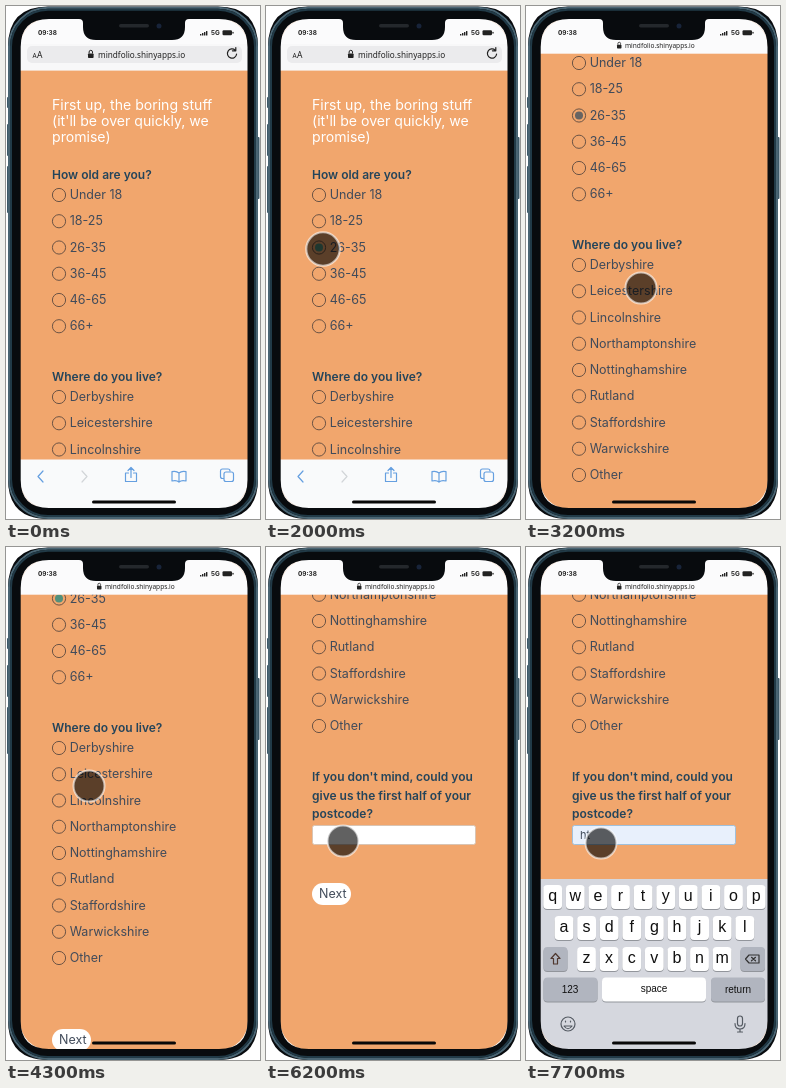
Animation, 254 px wide and 513 px high, one loop 8 s. Source, as an HTML page:

```html
<!DOCTYPE html>
<html lang="en">
<head>
<meta charset="utf-8">
<title>Phone survey</title>
<style>
  html, body { margin: 0; width: 100%; height: 100%; overflow: hidden; background: #fff; }
  svg { display: block; width: 254px; height: 513px; }
  text { font-family: Inter, "Open Sans", sans-serif; font-size: 12.5px; fill: #414b5a; }
  .title { font-size: 14.1px; font-weight: 400; fill: #fff; }
  .ask { font-size: 12px; font-weight: 600; fill: #24445a; }
  .ring { fill: none; stroke: #5d4a40; stroke-width: .9; }
  .status { font-size: 6.4px; font-weight: 700; fill: #222; }
  .url { font-family: "Noto Sans", "Open Sans", sans-serif; fill: #222; }
  .key { font-family: "Liberation Sans", Arial, sans-serif; font-size: 16px; fill: #111; text-anchor: middle; }
  .small { font-size: 10px; }
  .line { fill: none; stroke-width: 1.2; stroke-linecap: round; stroke-linejoin: round; }
  .blue { stroke: #659fe0; }
</style>
</head>
<body>
<svg id="stage" viewBox="0 0 254 513"></svg>
<script>
const LOOP = 8000, STEP = 100;
const ages = ["Under 18", "18-25", "26-35", "36-45", "46-65", "66+"];
const places = ["Derbyshire", "Leicestershire", "Lincolnshire", "Northamptonshire",
  "Nottinghamshire", "Rutland", "Staffordshire", "Warwickshire", "Other"];

// Rows of [time, value, ...], eased between neighbours.
const touchPath = [
  [700, 150, 535], [1500, 57, 243], [2000, 57, 243], [2600, 115, 414],
  [3200, 115, 282], [3300, 115, 282], [3600, 115, 224], [3700, 115, 224],
  [4300, 83, 239], [4600, 53, 227], [4800, 53, 227], [5200, 98, 379],
  [5500, 98, 263], [5800, 98, 147], [6200, 77, 294], [6400, 75, 296]
];
const pressPath = [
  [1300, 1], [1500, 1.08], [2000, 1.08], [2300, 1], [4400, 1], [4600, 1.08], [4800, 1.08], [5100, 1]
];
const scrollPath = [
  [2600, 0], [3200, 132], [3300, 132], [3600, 190], [5200, 190], [5500, 306], [5800, 422]
];
const collapsePath = [[2600, 0], [3000, 1]];
const keysPath = [[6500, 180], [6800, 0]];

const text = (x, mid, s, cls = "", drop = 4.3) =>
  `<text x="${x}" y="${mid + drop}" class="${cls}">${s}</text>`;
const rect = (x, y, w, h, r, fill, more = "") =>
  `<rect x="${x}" y="${y}" width="${w}" height="${h}" rx="${r}" fill="${fill}" ${more}/>`;
const line = (d, cls = "blue", more = "") => `<path d="${d}" class="line ${cls}" ${more}/>`;

const choices = (list, top) => list.map((s, i) => {
  const y = top + i * 26.25;
  return `<circle cx="53" cy="${y}" r="6.6" class="ring"/>` + text(63.7, y - .2, s);
}).join("");
const lines = (list, top, gap, cls) =>
  list.map((s, i) => text(46, top + i * gap, s, cls, cls == "title" ? 4.8 : 4.3)).join("");

function page() {
  return lines(["First up, the boring stuff", "(it'll be over quickly, we", "promise)"], 99, 16, "title")
    + text(46, 169, "How old are you?", "ask") + choices(ages, 189)
    + text(46, 371, "Where do you live?", "ask")
    + `<circle id="halo" cx="53" cy="417" r="24" fill="#e0ad78" opacity=".28"/>`
    + choices(places, 391)
    + `<circle id="ageDot" cx="53" cy="241.5" r="4"/>`
    + `<circle id="placeDot" cx="53" cy="417.2" r="4" fill="#686462"/>`
    + `<g id="postcode">`
    + lines(["If you don't mind, could you", "give us the first half of your", "postcode?"], 652, 18.4, "ask")
    + `<rect id="field" x="46.5" y="700.5" width="163" height="19" rx="2"/>`
    + `<text id="typed" x="54" y="714" style="font-size:11px"></text>`
    + `<path id="caret" d="M54 704V716" stroke="#333"/></g>`
    + `<g id="next">` + rect(46, -11, 39, 22, 11, "#fff") + text(53, 0, "Next", "", 4) + `</g>`;
}

function header() {
  const signal = [0, 1, 2, 3].map(i => rect(194 + i * 2, 28 - i, 1.4, 1.6 + i, .3, "#222")).join("");
  return rect(14, 10, 229, 37.7, 0, "#fbfbfc")
    + `<g id="bar">` + rect(14, 38, 229, 26.6, 0, "#f8f8f9") + rect(21, 40, 215, 17, 5, "#ebebed")
    + `<g style="font-size:7px">` + `<text x="26.5" y="51.500" class="url" style="font-size:6.500px">A</text>`
    + `<text x="31" y="51.500" class="url" style="font-size:8.500px">A</text></g>`
    + line("M229.2 44.2A4.6 4.6 0 1 0 230.6 48M229.8 41.5V44.8H226.4", "", 'stroke="#222"') + `</g>`
    + `<g id="address"><rect x="-10" y="-4" width="5.6" height="4.6" rx=".8" fill="#222"/>`
    + `<path d="M-8.9 -4V-5.5A1.7 1.7 0 0 1 -5.5 -5.5V-4" fill="none" stroke="#222"/>`
    + `<text class="url" style="font-size:8.2px">mindfolio.shinyapps.io</text></g>`
    + text(32, 27, "09:38", "status", 2.3) + signal + text(205, 27, "5G", "status", 2.3)
    + rect(216.5, 24.3, 9.5, 5, 1.2, "#222") + rect(226.5, 25.8, 1, 2, .5, "#222");
}

function footer() {
  return rect(14, 453.5, 229, 52, 0, "#f9fafb")
    + line("M37 465L32 470.5L37 476") + line("M76 465L81 470.5L76 476", "", 'stroke="#d2d5d8"')
    + line("M122.5 467H119.5V475.5H130.5V467H127.5M125 471.5V462M122 464.5L125 461.5L128 464.5")
    + line("M173 467V476C171 474.3 168.5 474.3 166 475V465.7C168.5 465 171 465.3 173 467C175 465.3 177.5 465 180 465.7V475C177.5 474.3 175 474.3 173 476")
    + line("M217.5 472.5H216.5A2 2 0 0 1 214.5 470.5V465A2 2 0 0 1 216.5 463H222A2 2 0 0 1 224 465")
    + rect(218, 466, 9.5, 9.5, 2, "none", 'class="line blue"');
}

function keyboard() {
  const cap = (x, y, w, fill = "#fff") =>
    rect(x, y - 11, w, 24, 4, "#92959b") + rect(x, y - 12, w, 24, 4, fill);
  const row = (letters, first, y) => [...letters].map((c, i) => {
    const x = first + i * 22.6;
    return cap(x - 9.4, y, 18.8) + text(x, y, c, "key", 3.8);
  }).join("");
  const grey = "#b1b5bf";
  return rect(14, 332, 229, 175, 0, "#d5d7de")
    + row("qwertyuiop", 26.7, 350) + row("asdfghjkl", 38, 381) + row("zxcvbnm", 60.5, 412)
    + cap(17.5, 412, 24, grey) + cap(214.5, 412, 24.5, grey)
    + line("M29.5 406.5L34 411.5H31.5V417H27.5V411.5H25Z", "", 'stroke="#50382f"')
    + line("M223 408H233V416H223L219.5 412ZM225.5 410.3L229.5 413.8M229.5 410.3L225.5 413.8", "", 'stroke="#333"')
    + cap(17.5, 442.5, 54, grey) + cap(76, 442.5, 104, "#fff") + cap(185, 442.5, 54, grey)
    + text(44, 442, "123", "key small", 3.7) + text(128, 442, "space", "key small", 3) + text(212, 442, "return", "key small", 3.7)
    + `<g class="line" stroke="#555b63"><circle cx="42" cy="477" r="7"/>`
    + `<path d="M38 479Q42 484.5 46 479ZM39.5 474V475M44.5 474V475"/>`
    + `<rect x="211.5" y="469" width="5" height="10" rx="2.5"/>`
    + `<path d="M209 476.5Q209 482 214 482T219 476.5M214 482V485M211.5 485H216.5"/></g>`;
}

function phone() {
  const side = (x, y, h) => rect(x, y, 3, h, 1, "#3d5968");
  return side(1, 91, 11) + side(1, 118, 32) + side(1, 160, 47) + side(250.5, 131, 62)
    + `<path fill-rule="evenodd" fill="#080b0e" d="M42 .5H212Q252 .5 252 41V473Q252 513 212 513H42Q2 513 2 473V41Q2 .5 42 .5Z
      M43 13Q14.7 13 14.7 41V474Q14.7 502 43 502H213Q241.500 502 241.500 474V41Q241.500 13 213 13H183Q179 13 179 17V21Q179 34 166 34H90Q77 34 77 21V17Q77 13 73 13Z"/>`
    + rect(3, 1.7, 248, 510.3, 39, "none", 'stroke="#4a6573" stroke-width="2"')
    + rect(5, 3.7, 244, 506.3, 37, "none", 'stroke="#213a47" stroke-width="2"')
    + rect(113, 18, 30, 3.5, 1.7, "#24282c") + `<circle cx="153" cy="20" r="2.5" fill="#18243a"/>`;
}

const stage = document.getElementById("stage");
stage.innerHTML = `<clipPath id="glass"><rect x="14" y="12" width="228" height="491" rx="29"/></clipPath>
  <g clip-path="url(#glass)">
    <rect x="14" y="10" width="229" height="494" fill="#f1a66d"/>
    <g id="page">${page()}</g>
    <g id="footer">${footer()}</g>
    <g id="keys">${keyboard()}</g>
    ${header()}
    <rect x="86" y="494.5" width="84" height="3" rx="1.5" fill="#080808"/>
    <g id="touch"><circle r="15.5" fill="#000" fill-opacity=".62"/>
      <circle r="15.5" fill="none" stroke="#fff" stroke-opacity=".6" stroke-width="2"/></g>
  </g>${phone()}`;

const el = {};
stage.querySelectorAll("[id]").forEach(n => el[n.id] = n);
const move = (n, x, y, s = 1) => n.setAttribute("transform", `translate(${x} ${y}) scale(${s})`);
const show = (n, on) => n.setAttribute("visibility", on ? "visible" : "hidden");

function at(path, t) {
  const i = path.findIndex(p => p[0] > t);
  if (i == 0) return path[0].slice(1);
  if (i < 0) return path[path.length - 1].slice(1);
  const a = path[i - 1], b = path[i];
  const u = (t - a[0]) / (b[0] - a[0]), k = u * u * (3 - 2 * u);
  return a.slice(1).map((v, j) => v + (b[j + 1] - v) * k);
}

function draw(t) {
  const [c] = at(collapsePath, t);
  move(el.page, 0, -at(scrollPath, t)[0]);
  move(el.touch, ...at(touchPath, t), at(pressPath, t)[0]);
  show(el.touch, t >= 800);
  move(el.bar, 0, -17 * c);
  el.bar.setAttribute("opacity", 1 - c);
  move(el.address, 92 + 7 * c, 51.5 - 9.5 * c, 1 - .2 * c);
  move(el.footer, 0, 54 * c);
  move(el.keys, 0, at(keysPath, t)[0]);

  const asked = t >= 4900, focused = t >= 6600;
  show(el.ageDot, t >= 2000);
  el.ageDot.setAttribute("fill", t < 2400 || (t >= 3800 && !asked) ? "#52907c" : "#686462");
  show(el.placeDot, asked);
  show(el.halo, asked);
  show(el.postcode, asked);
  move(el.next, 0, asked ? 769 : 683);
  el.field.setAttribute("fill", focused ? "#e8f0fc" : "#fff");
  el.field.setAttribute("stroke", focused ? "#9fc0dc" : "#d9c4b3");
  el.typed.textContent = t >= 7700 ? "ht" : t >= 7600 ? "h" : "";
  show(el.caret, t >= 7200 && t < 7600);
}

const start = performance.now();
function frame() {
  const t = (performance.now() - start) % LOOP;
  draw(Math.floor(t / STEP) * STEP);
  requestAnimationFrame(frame);
}
frame();
</script>
</body>
</html>
```
